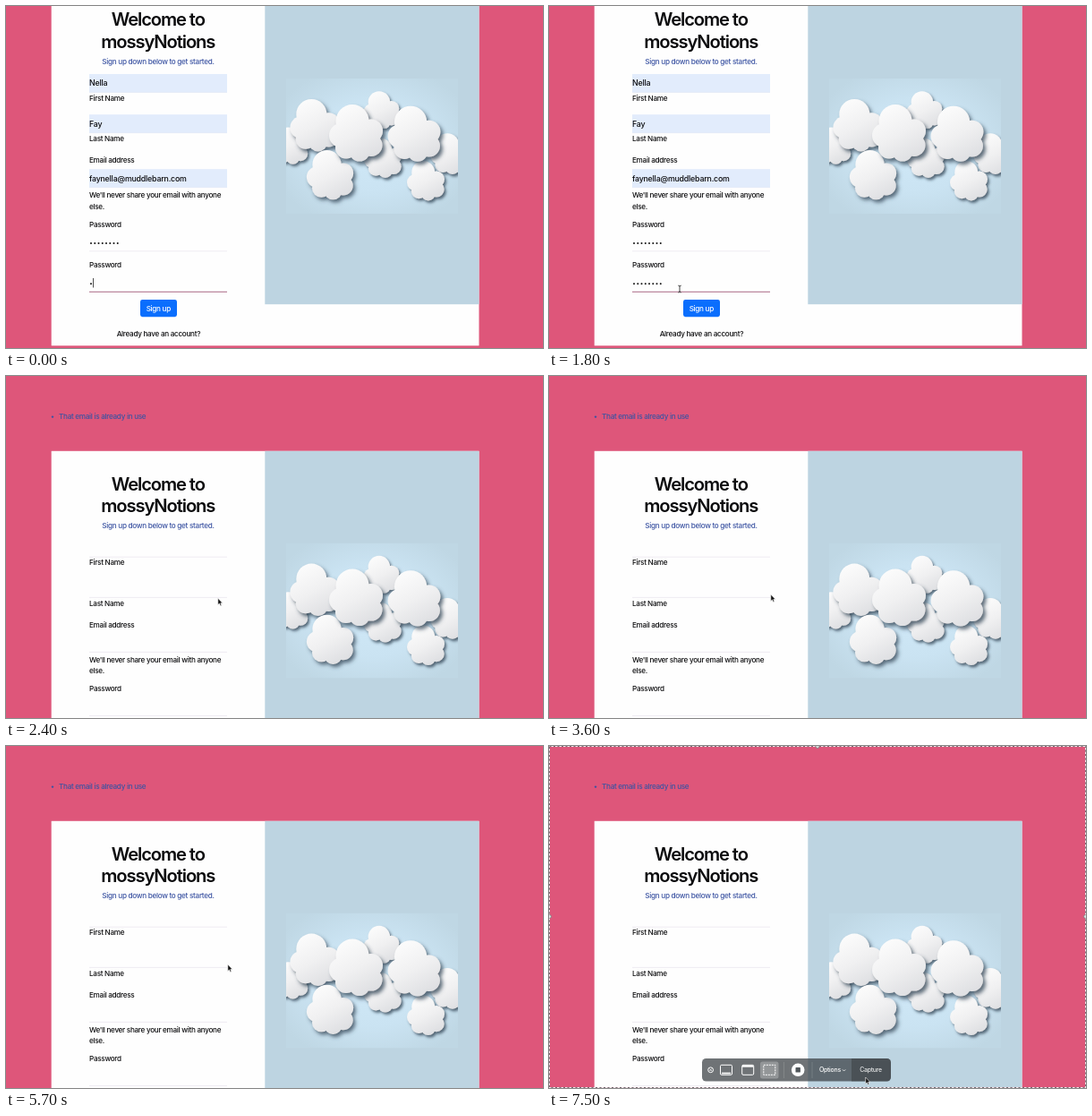
Write an HTML page that moves like this. It is 600 by 382 pixels and loops after 7600 ms.

```html
<!DOCTYPE html>
<html lang="en">
<head>
<meta charset="utf-8">
<title>Sign up form</title>
<style>
  html, body { margin: 0; width: 100%; height: 100%; overflow: hidden; background: #de567a; }
  svg { display: block; width: 100vw; height: 100vh; }
  text { font: 500 8.16px Inter, "Open Sans", sans-serif; letter-spacing: -.037em; fill: #0c0c0e; }
  .title { font-size: 20.2px; font-weight: 600; letter-spacing: -.055em; text-anchor: middle; }
  .mid { text-anchor: middle; }
  .blue { fill: #3b53a2; }
  .value { font-size: 8.8px; letter-spacing: -.022em; }
  .light { fill: #fff; }
  .tool { font-size: 6.9px; fill: #fff; }
</style>
</head>
<body>
<svg viewBox="0 0 600 382" preserveAspectRatio="none">
  <defs>
    <radialGradient id="sky" r=".62">
      <stop offset="0" stop-color="#d0e9f8"/>
      <stop offset=".55" stop-color="#cae3f2"/>
      <stop offset="1" stop-color="#bfd7e4"/>
    </radialGradient>
    <linearGradient id="puff" gradientUnits="userSpaceOnUse" x1="-16" y1="-26" x2="14" y2="30">
      <stop offset="0" stop-color="#fbfbfb"/>
      <stop offset=".5" stop-color="#f0f0f1"/>
      <stop offset="1" stop-color="#dedfe2"/>
    </linearGradient>
    <filter id="shade" x="-30%" y="-30%" width="170%" height="170%">
      <feDropShadow dx="3" dy="3.6" stdDeviation="2.2" flood-color="#37485a" flood-opacity=".8"/>
    </filter>
    <clipPath id="picture"><rect x="313" y="81" width="192" height="151"/></clipPath>
  </defs>

  <rect width="600" height="382" fill="#de567a"/>
  <g id="notice">
    <circle cx="52" cy="45.6" r="1.2" class="blue"/>
    <text x="59" y="48.4" class="blue">That email is already in use</text>
  </g>

  <g id="page">
    <rect x="50.7" y="-21.8" width="477.8" height="401.2" fill="#fefefe"/>
    <rect x="289.3" y="-21.8" width="239.2" height="355" fill="#bdd4e1"/>
    <g clip-path="url(#picture)">
      <rect x="313" y="81" width="192" height="151" fill="url(#sky)"/>
      <g id="clouds"></g>
    </g>
    <text x="169.8" y="22.3" class="title">Welcome to</text>
    <text x="169.8" y="46.9" class="title">mossyNotions</text>
    <text x="170" y="64.5" class="mid blue">Sign up down below to get started.</text>
    <g id="lines"></g>
    <g id="filled"></g>
    <g id="labels"></g>
    <g id="dots"></g>
    <rect id="focus" x="93" y="318.8" width="154" height="1"/>
    <rect id="caret" y="304" width=".8" height="10.5" fill="#222"/>
    <rect id="button" x="150" y="328" width="41" height="19.2" rx="2.4"/>
    <text x="170.3" y="340.7" class="mid light">Sign up</text>
    <text x="170.4" y="368.6" class="mid">Already have an account?</text>
  </g>

  <g id="capture">
    <g fill="none">
      <rect x=".5" y=".5" width="599" height="381" stroke="#f1e3e7"/>
      <rect x=".5" y=".5" width="599" height="381" stroke="#7b6a72" stroke-dasharray="2 2.5"/>
    </g>
    <g fill="#ddd" stroke="#777" stroke-width=".7">
      <circle cx="300" cy=".5" r="2"/><circle cx=".5" cy="190.5" r="2"/><circle cx="599.5" cy="190.5" r="2"/>
    </g>
    <rect x="171" y="349" width="211" height="25.5" rx="4.5" fill="#3c4145" fill-opacity=".73"/>
    <path d="M338 349h39.5a4.5 4.5 0 0 1 4.5 4.5v16.5a4.5 4.5 0 0 1 -4.5 4.5h-39.5z" fill="#373b3e" fill-opacity=".5"/>
    <rect x="236" y="352.5" width="20.5" height="19" rx="2.5" fill="#fff" fill-opacity=".25"/>
    <path d="M262.5 353v18M294 353v18" stroke="#fff" stroke-opacity=".2" stroke-width=".7"/>
    <g fill="none" stroke="#fff" stroke-width="1">
      <circle cx="180.6" cy="361.8" r="2.9"/>
      <path d="M179.4 360.6l2.4 2.4m0 -2.4l-2.4 2.4" stroke-width=".8"/>
      <rect x="191.5" y="356.3" width="13" height="11" rx="1.3"/>
      <path d="M193 365.5h10" stroke-width="1.6"/>
      <rect x="215.7" y="356.3" width="13" height="11" rx="1.3"/>
      <path d="M216 357.7h12.4" stroke-width="2"/>
      <rect x="239.8" y="356.3" width="13" height="11" stroke-dasharray="2 1"/>
      <path d="M328 361.4l1.6 1.6l1.6 -1.6" stroke-width=".8"/>
    </g>
    <circle cx="278.2" cy="361.8" r="7.3" fill="#fff"/>
    <rect x="275.5" y="359.1" width="5.4" height="5.4" rx=".6" fill="#50565a"/>
    <text x="302" y="364.4" class="tool">Options</text>
    <text x="347.3" y="364.4" class="tool" fill-opacity=".88">Capture</text>
  </g>

  <g id="pointer">
    <path id="beam" d="M-1.7 -3.8Q0 -3.8 0 -2.6Q0 -3.8 1.7 -3.8M0 -2.8V3.2M-1.7 4Q0 4 0 2.8Q0 4 1.7 4" fill="none" stroke="#333" stroke-width=".9"/>
    <path id="arrow" d="M0 0V7.4L1.7 5.9L2.8 8.6L4.1 8L3 5.5H5.2Z" fill="#111" stroke="#fff" stroke-width=".6"/>
    <path id="finger" d="M-.8 0Q0 -.8 .8 0V3L4 3.8V6.5L3 8.5H-1.5L-3.4 5Q-2.6 4 -.8 5Z" fill="#fff" stroke="#222" stroke-width=".7"/>
    <path id="hand" d="M-2 4L-4 .8Q-4.2 -.7 -2.4 .3L-3 -2.5Q-2.2 -4 -1.4 -2.6Q-.8 -5 .2 -3.1Q1.2 -4.7 1.9 -2.6Q3.3 -3.5 3.5 -1.5L3 2L2.2 4Z
      M-1.4 -2.6L-1 -.3M.2 -3.1V-.4M1.9 -2.6L1.5 -.3" fill="#fff" stroke="#333" stroke-width=".8" stroke-linejoin="round"/>
  </g>
</svg>
<script>
const LOOP = 7600, STEP = 100, SUBMIT = 2400, OVERLAY = 7000;
const $ = id => document.getElementById(id);
const show = (id, on) => $(id).setAttribute('display', on ? 'inline' : 'none');
const set = (id, attrs) => Object.entries(attrs).forEach(([k, v]) => $(id).setAttribute(k, v));

// Cloud lobes: x, y, radius
const lobes = [[-4, -13, 18.5], [-16.5, 3, 13.5], [-11, 17, 12], [4, 20.5, 11.5], [17, 14, 12.5], [17, -2, 13], [0, 4, 21]];
const puffs = lobes.map(([x, y, r]) => `<circle cx="${x}" cy="${y}" r="${r}"/>`).join('');
// Clouds from back to front: x, y, scale
const clouds = [
  [419.5, 116, .66], [421, 169.5, .7], [318, 156, .65], [496, 165, .72],
  [345, 133, .92], [362, 188.5, .87], [469, 195, .7], [391, 141.5, 1], [456, 142.5, .98]
];
$('clouds').innerHTML = clouds.map(([x, y, s]) =>
  `<g transform="translate(${x} ${y}) scale(${s})" fill="url(#puff)" filter="url(#shade)">${puffs}</g>`).join('');

$('lines').innerHTML = [96.4, 141.6, 202.6, 273.8, 319].map(y =>
  `<rect x="93" y="${y - .3}" width="154" height=".8" fill="#ebe7ef"/>`).join('');

const label = (s, y, cls = '') => `<text x="93" y="${y}" class="${cls}">${s}</text>`;
$('labels').innerHTML = [
  ['First Name', 105.8], ['Last Name', 151], ['Email address', 175.1],
  ["We'll never share your email with anyone", 214.2], ['else.', 226.5],
  ['Password', 246.7], ['Password', 291.9]
].map(([s, y]) => label(s, y)).join('');

$('filled').innerHTML = [['Nella', 76], ['Fay', 121.2], ['faynella@muddlebarn.com', 182.2]].map(([s, y]) =>
  `<rect x="93" y="${y}" width="154" height="20.6" fill="#e2ecfc"/>` + label(s, y + 13.4, 'value')).join('');

const dotX = i => 95 + i * 4.25;
const dotRow = (n, y) => Array.from({ length: n }, (_, i) =>
  `<circle cx="${dotX(i)}" cy="${y}" r="1" fill="#111"/>`).join('');

// Pointer path: time, x, y, shape
const path = [
  [1700, 146, 316, 'beam'], [1800, 146, 316, 'beam'], [2000, 169, 335, 'finger'], [2100, 171, 334, 'finger'],
  [2200, 192, 309, 'beam'], [2300, 212, 284, 'beam'], [2400, 236.8, 248.2, 'arrow'], [2900, 247.8, 244, 'arrow'],
  [6100, 247.8, 244, 'arrow'], [6600, 333, 202, 'hand'], [6900, 333, 202, 'hand'],
  [7000, 337, 230, 'arrow'], [7400, 353.7, 370, 'arrow'], [7600, 353.7, 370, 'arrow']
];
const shapes = ['beam', 'arrow', 'finger', 'hand'];

function movePointer(t) {
  show('pointer', t >= path[0][0]);
  if (t < path[0][0]) return;
  const i = path.findIndex((p, k) => t >= p[0] && t < path[k + 1][0]);
  const [t0, x0, y0, shape] = path[i], [t1, x1, y1] = path[i + 1];
  const u = (t - t0) / (t1 - t0), e = u * u * (3 - 2 * u);
  set('pointer', { transform: `translate(${x0 + (x1 - x0) * e} ${y0 + (y1 - y0) * e})` });
  shapes.forEach(s => show(s, s === shape));
}

function draw(t) {
  const sent = t >= SUBMIT, clicked = t >= 2100;
  const typed = Math.min(8, 1 + Math.floor(t / 180));
  set('page', { transform: `translate(0 ${sent ? 105.6 : 0})` });
  show('notice', sent);
  show('filled', !sent);
  $('dots').innerHTML = sent ? '' : dotRow(8, 265) + dotRow(typed, 310.2);
  show('focus', !sent);
  set('focus', { fill: clicked ? '#c6c5ce' : '#b0708a' });
  show('caret', t < 1600);
  set('caret', { x: dotX(typed - 1) + 2 });
  set('button', { fill: t >= 2000 && !sent ? '#095cd3' : '#0a6efd' });
  show('capture', t >= OVERLAY);
  movePointer(t);
}

const start = performance.now();
function tick() {
  const t = (performance.now() - start) % LOOP;
  draw(Math.floor(t / STEP) * STEP);
  requestAnimationFrame(tick);
}
tick();
</script>
</body>
</html>
```
